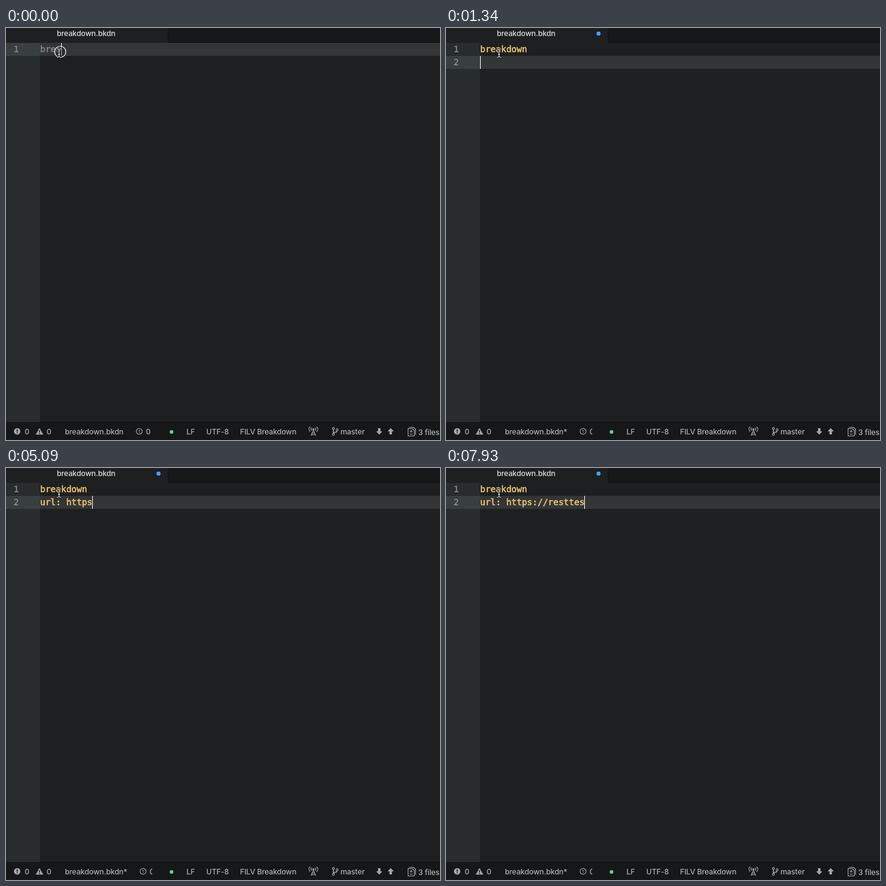
Write an HTML page that moves like this. It is 700 px wide and 665 px high and loops after 8 s.

```html
<!DOCTYPE html>
<html lang="en">
<head>
<meta charset="utf-8">
<title>Editor typing</title>
<style>
  html, body { margin: 0; width: 100%; height: 100%; overflow: hidden; background: #1d1f21; }
  svg { display: block; width: 700px; height: 665px; }
  .ui { font: 500 12px Inter, Roboto, sans-serif; letter-spacing: -.11px; fill: #acaeb0; }
  .code { font: 14px "DejaVu Sans Mono", "Noto Sans Mono", monospace; white-space: pre; stroke-width: .5; }
  .grey { fill: #83878a; stroke: #83878a; }
  .gold { fill: #f0c674; stroke: #f0c674; }
  .line { stroke: #a6a8aa; fill: none; stroke-width: 1.1; }
  .solid { fill: #a6a8aa; }
  .hole { stroke: #161719; stroke-width: 1.6; }
</style>
</head>
<body>
<svg viewBox="0 0 700 665">
  <defs>
    <clipPath id="cut"><rect x="205" y="637" width="31" height="28"/></clipPath>
    <path id="ibeam" d="M82.5 33.5Q85.5 33.5 85.5 36V45Q85.5 47.5 82.5 47.5M88.5 33.5Q85.5 33.5 85.5 36M85.5 45Q85.5 47.5 88.5 47.5M84 42.5H87" fill="none"/>
  </defs>

  <!-- tab bar -->
  <rect x="261" width="439" height="24" fill="#101113"/>
  <rect x="262" width="438" height="23" fill="#161719"/>
  <text class="ui" x="82" y="13" style="fill:#dcdee0">breakdown.bkdn</text>
  <circle id="dot" cx="246" cy="9" r="3.3" fill="#4a9eff"/>

  <!-- editor -->
  <rect y="24" width="55" height="612" fill="#282c2e"/>
  <g id="row">
    <rect y="24" width="55" height="21" fill="#393e40"/>
    <rect x="55" y="24" width="645" height="21" fill="#333537"/>
  </g>
  <g class="code">
    <text class="grey" x="12.3" y="39">1</text>
    <text class="grey" x="12.3" y="60" id="num2">2</text>
    <text x="55" y="39" id="line1"></text>
    <text x="55" y="60" id="line2" class="gold"></text>
  </g>
  <rect id="caret" width="1" height="21" fill="#fff"/>
  <circle id="click" cx="87.5" cy="38.5" r="9" fill="#1d1f21" fill-opacity=".35" stroke="#fff" stroke-width="1.2"/>
  <use href="#ibeam" stroke="#1d1f21" stroke-width="2.4"/>
  <use href="#ibeam" stroke="#eee"/>

  <!-- status bar -->
  <rect y="636" width="700" height="29" fill="#101113"/>
  <rect y="637" width="700" height="28" fill="#161719"/>
  <circle class="solid" cx="18" cy="651" r="5.2"/>
  <path class="hole" d="M18 647.7V651.8M18 652.8V654.3"/>
  <path class="solid" d="M54 645.5L60 656.3H48Z"/>
  <path class="hole" d="M54 649.2V652.6M54 653.5V655"/>
  <g class="ui">
    <text x="30" y="656">0</text>
    <text x="65.5" y="656">0</text>
    <text x="95" y="656" id="file"></text>
    <text x="291" y="656">LF</text>
    <text x="323" y="656">UTF-8</text>
    <text x="377.5" y="656">FILV Breakdown</text>
    <text x="539.5" y="656">master</text>
    <text x="665" y="657">3 files</text>
  </g>
  <g clip-path="url(#cut)">
    <g id="issues">
      <circle class="line" cx="215" cy="651" r="4.8"/>
      <path class="line" d="M215 648V651.8M215 652.7V654"/>
      <text class="ui" x="225.5" y="656">0</text>
    </g>
  </g>
  <circle cx="267" cy="652" r="3" fill="#68cc8b"/>

  <!-- radio tower -->
  <g class="line">
    <path d="M490.5 643.5Q486.5 647.5 490.5 651.5M493 645.2Q490.8 647.5 493 649.8M501 643.5Q505 647.5 501 651.5M498.5 645.2Q500.7 647.5 498.5 649.8"/>
    <path d="M495.75 649L492 658M495.75 649L499.5 658M494 653.8H497.5M492.8 656.5H498.8"/>
    <circle class="solid" cx="495.75" cy="647.5" r="1"/>
  </g>
  <!-- branch -->
  <g class="line">
    <circle cx="528" cy="646.5" r="1.6"/>
    <circle cx="528" cy="656" r="1.6"/>
    <circle cx="534" cy="648.3" r="1.6"/>
    <path d="M528 648V654.5M534 650Q534 652.4 530.5 652.7Q528.2 653 528 654.5" stroke-width="1.5"/>
  </g>
  <!-- pull and push -->
  <path class="solid" d="M600 646H604V651H607L602 656.3L597 651H600Z"/>
  <path class="solid" d="M618.5 656V651H615.5L620.5 645.7L625.5 651H622.5V656Z"/>
  <!-- changed files -->
  <path class="line" d="M650.5 644.5H657.5L660.5 647.5V656.5M648.5 646.5H655.5L658.5 649.5V658.5H648.5ZM653.5 648.8V653.2M651.3 651H655.7M651.3 655.5H655.7"/>
</svg>
<script>
const LOOP = 8000, LEFT = 55, TOP = 24, ROW = 21, CHAR = 8.424;
const PACE = 150, BLINK = 750, LIT = 300;
const WORD = "breakdown", MODIFIED = 900;

// Bursts of typing: start time, text, optional pace per character.
const bursts = [
  [-450, "breakdo"], [600, "wn", 0], [1340, "\n"], [2390, "url", 75],
  [2840, ": "], [3590, "h"], [3890, "tt"], [4340, "p"], [5090, "s"],
  [5530, ":"], [6280, "//", 0], [7030, "re", 0], [7330, "sttes"]
];
const keys = bursts.flatMap(([start, text, pace = PACE]) =>
  [...text].map((char, i) => ({ char, time: start + i * pace })));

const el = id => document.getElementById(id);
const show = (id, on) => el(id).setAttribute("visibility", on ? "visible" : "hidden");

function draw(t) {
  const typed = keys.filter(k => k.time <= t);
  const lines = typed.map(k => k.char).join("").split("\n");
  const row = lines.length - 1;
  const idle = t - typed[typed.length - 1].time;
  const changed = t >= MODIFIED;

  el("line1").textContent = lines[0];
  el("line1").setAttribute("class", lines[0] === WORD ? "gold" : "grey");
  el("line2").textContent = lines[1] || "";
  el("row").setAttribute("transform", `translate(0 ${row * ROW})`);
  show("num2", row > 0);

  // The caret restarts its blink at every key.
  el("caret").setAttribute("x", Math.round(LEFT + lines[row].length * CHAR));
  el("caret").setAttribute("y", TOP + row * ROW);
  show("caret", idle % BLINK < LIT);
  show("click", t < PACE);

  show("dot", changed);
  el("file").textContent = "breakdown.bkdn" + (changed ? "*" : "");
  el("issues").setAttribute("transform", `translate(${changed ? 6 : 0} 0)`);
}

const start = performance.now();
function tick() {
  draw((performance.now() - start) % LOOP);
  requestAnimationFrame(tick);
}
tick();
</script>
</body>
</html>
```
